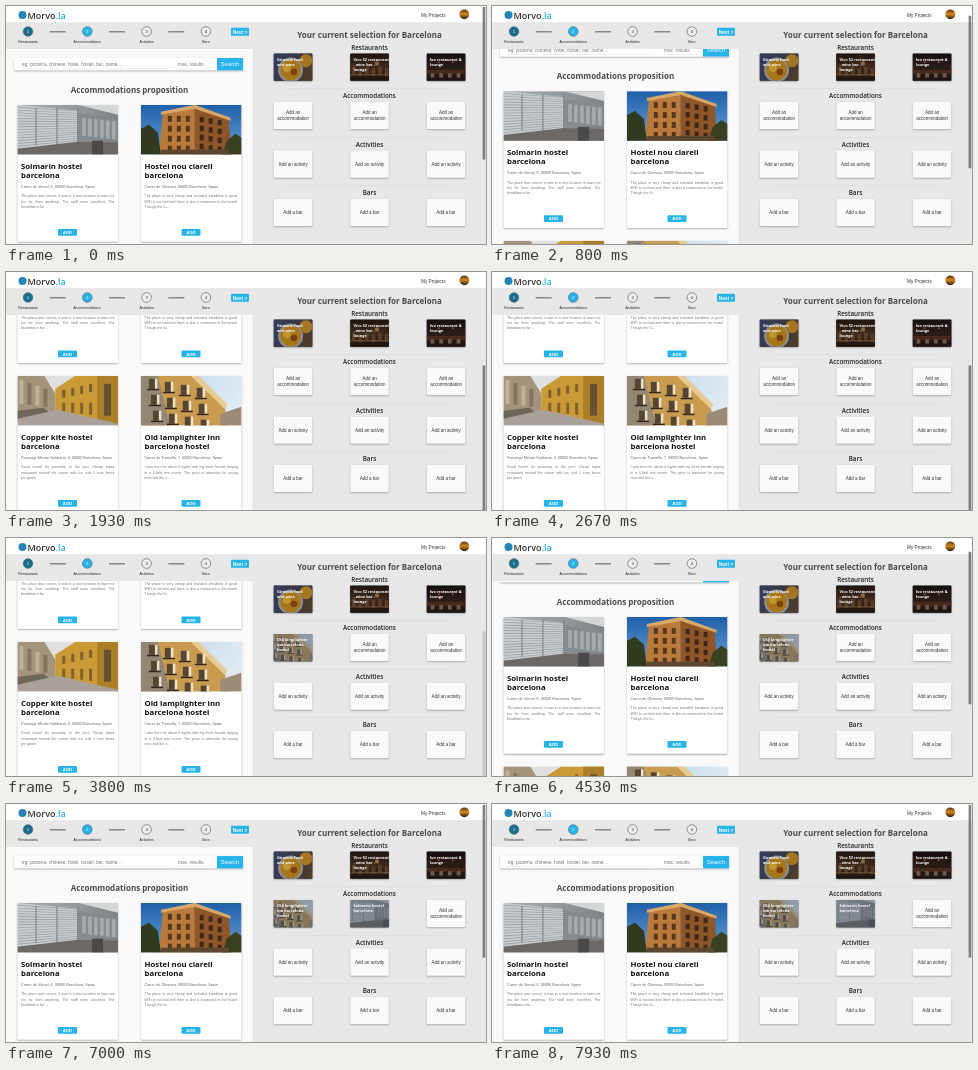
These frames come from a looping animation (480 by 238 pixels, 8000 ms). An HTML page with a canvas:

```html
<!DOCTYPE html>
<html lang="en">
<head>
<meta charset="utf-8">
<title>Trip planner</title>
<style>
html, body { margin: 0; width: 100%; height: 100%; overflow: hidden; background: #fafafa; }
canvas { display: block; width: 480px; height: 238px; }
</style>
</head>
<body>
<canvas id="stage"></canvas>
<script>
const W = 480, H = 238, LOOP = 8000;
const BLUE = '#27b4ea', TEAL = '#1b6c8a', GREY = '#e8e8e8';
const HEAD = '"Open Sans", sans-serif', BODY = '"Liberation Sans", sans-serif';
const canvas = document.getElementById('stage');
const ctx = canvas.getContext('2d');
const dpr = window.devicePixelRatio || 1;
canvas.width = W * dpr;
canvas.height = H * dpr;

const SCROLL = [[0, 0], [700, 0], [1270, 77.5], [1900, 144.5], [3900, 144.5], [4530, 20], [4800, 0], [LOOP, 0]];

function scrollAt(t) {
  const i = SCROLL.findIndex(k => k[0] > t);
  const [t0, a] = SCROLL[i - 1], [t1, b] = SCROLL[i];
  return a + (b - a) * (t - t0) / (t1 - t0);
}

function rect(x, y, w, h, fill) {
  ctx.fillStyle = fill;
  ctx.fillRect(x, y, w, h);
}

function pill(x, y, w, h, fill, r = 0.8) {
  ctx.fillStyle = fill;
  ctx.beginPath();
  ctx.roundRect(x, y, w, h, r);
  ctx.fill();
}

function poly(fill, ...p) {
  ctx.fillStyle = fill;
  ctx.beginPath();
  for (let i = 0; i < p.length; i += 2) ctx.lineTo(p[i], p[i + 1]);
  ctx.fill();
}

function disc(x, y, r, fill, stroke) {
  ctx.beginPath();
  ctx.arc(x, y, r, 0, Math.PI * 2);
  ctx.fillStyle = fill;
  ctx.fill();
  if (stroke) {
    ctx.strokeStyle = stroke;
    ctx.lineWidth = 0.7;
    ctx.stroke();
  }
}

function text(s, x, y, size, color, { weight = 400, font = BODY, align = 'left' } = {}) {
  ctx.font = `${weight} ${size}px ${font}`;
  ctx.textAlign = align;
  ctx.textBaseline = 'alphabetic';
  ctx.fillStyle = color;
  ctx.fillText(s, x, y);
}

function justify(s, x, y, width, size, color) {
  ctx.font = `400 ${size}px ${BODY}`;
  const words = s.split(' ');
  const widths = words.map(w => ctx.measureText(w).width);
  const gap = (width - widths.reduce((a, b) => a + b)) / (words.length - 1);
  words.forEach((w, i) => {
    text(w, x, y, size, color);
    x += widths[i] + gap;
  });
}

function raised(x, y, w, h, fill) {
  ctx.save();
  ctx.shadowColor = 'rgba(0,0,0,.35)';
  ctx.shadowBlur = 1.6 * dpr;
  ctx.shadowOffsetY = 0.8 * dpr;
  pill(x, y, w, h, fill);
  ctx.restore();
}

function gradient(x0, y0, x1, y1, ...colors) {
  const g = ctx.createLinearGradient(x0, y0, x1, y1);
  colors.forEach((c, i) => g.addColorStop(i / (colors.length - 1), c));
  return g;
}

// Scenes fill a 101 x 50 box.
const scenes = {
  louvre() {
    rect(0, 0, 101, 50, gradient(0, 0, 101, 50, '#a7adb0', '#92989b', '#777a7c'));
    poly('#c9cdcf', 0, 0, 60, 6, 60, 38, 0, 44);
    for (let i = 0; i < 15; i++) {
      const y = 2 + i * 2.8;
      poly('#9da4a8', 0, y, 60, 6 + i * 2.1, 60, 6.7 + i * 2.1, 0, y + 0.9);
    }
    for (const x of [18, 39, 60]) rect(x, 3, 1.2, 37, '#7f878b');
    poly('#848a8d', 61, 8, 101, 15, 101, 36, 61, 34);
    for (let i = 0; i < 6; i++) rect(65 + i * 6, 13 + i * 0.7, 3.6, 18, '#a6abac');
    poly('#6b6865', 0, 44, 60, 37, 101, 38, 101, 50, 0, 50);
    rect(75, 36, 11, 14, '#4a494a');
    poly('#d5d7d6', 61, 0, 101, 0, 101, 10);
  },
  brick() {
    rect(0, 0, 101, 50, gradient(0, 0, 0, 50, '#1f5fa8', '#6ba3d8'));
    poly('#b97a3c', 22, 8, 54, 2, 54, 50, 18, 50);
    poly('#8f562a', 54, 2, 88, 14, 91, 50, 54, 50);
    poly('#d9a766', 20, 7, 54, 0, 90, 13, 90, 16, 54, 4, 20, 10);
    for (let r = 0; r < 4; r++) {
      for (let c = 0; c < 3; c++) {
        rect(27 + c * 9, 11 + r * 10, 4, 6, '#55371f');
        rect(59 + c * 9, 12 + r * 9 + c * 1.5, 4, 5.5, '#3f2818');
      }
    }
    poly('#2f3a20', 0, 24, 8, 20, 17, 28, 20, 50, 0, 50);
    poly('#38401f', 86, 36, 95, 29, 101, 33, 101, 50, 82, 50);
    rect(20, 45, 68, 5, '#5b4630');
  },
  yellow() {
    rect(0, 0, 101, 50, '#dfe0df');
    poly('#a3947b', 0, 0, 27, 0, 38, 18, 38, 36, 0, 42);
    for (let i = 0; i < 4; i++) rect(2 + i * 8, 4 + i * 3, 4, 24 - i * 2, i % 2 ? '#82745f' : '#c0b199');
    poly('#c99a35', 38, 13, 58, 0, 101, 0, 101, 50, 38, 36);
    poly('#ab7f28', 80, 0, 101, 0, 101, 50, 80, 45);
    for (let i = 0; i < 4; i++) {
      rect(45 + i * 9, 14 - i * 2, 3, 8, '#7d5e30');
      rect(45 + i * 9, 27, 3, 9 + i, '#80622f');
    }
    rect(87, 8, 7, 32, '#66502f');
    poly('#aaa29a', 0, 41, 40, 34, 101, 48, 101, 50, 0, 50);
    poly('#6d6659', 0, 35, 26, 32, 31, 36, 0, 43);
  },
  ochre() {
    rect(0, 0, 101, 50, gradient(0, 0, 101, 50, '#b6d3ea', '#e6eef4'));
    poly('#c99b50', 0, 0, 57, 0, 84, 29, 87, 50, 0, 50);
    poly('#928675', 0, 0, 17, 0, 29, 50, 0, 50);
    poly('#e6cb94', 50, 0, 58, 0, 87, 29, 84, 33);
    for (let r = 0; r < 3; r++) {
      for (let c = 0; c < 4; c++) {
        const x = 8 + c * 16 + r * 2, y = 3 + r * 16 + c * 3;
        rect(x, y, 6, 10, '#574533');
        rect(x + 6, y, 2.5, 10, '#efe3c6');
        rect(x - 2, y + 10, 12, 1.5, '#30241c');
      }
    }
    poly('#9c8b74', 80, 38, 101, 31, 101, 50, 80, 50);
  },
  food() {
    rect(0, 0, 101, 50, gradient(0, 0, 101, 50, '#3d4c7c', '#40404d', '#6a4b22'));
    disc(46, 30, 23, '#a3a6aa');
    disc(46, 30, 19, '#c48a1d');
    disc(39, 27, 7, '#e0b13a');
    disc(52, 34, 6, '#8f4a18');
    disc(74, 13, 12, '#c08a2a');
  },
  cellar() {
    rect(0, 0, 101, 50, gradient(0, 0, 0, 50, '#241710', '#493021', '#1e1512'));
    for (let i = 0; i < 6; i++) rect(18 + i * 12, 24 + i % 2 * 3, 7, 14, '#67482f');
    rect(15, 38, 72, 2, '#8b623f');
    disc(64, 18, 4, '#a57a4c');
  },
  lounge() {
    rect(0, 0, 101, 50, gradient(0, 0, 0, 50, '#171111', '#33201a', '#201814'));
    for (let i = 0; i < 5; i++) disc(24 + i * 13, 12 + i % 2 * 4, 1.8, '#a35e2b');
    rect(15, 30, 72, 7, '#573022');
    for (let i = 0; i < 4; i++) rect(22 + i * 16, 36, 7, 8, '#7d6a5f');
  }
};

function scene(name, x, y, w, h) {
  const k = Math.max(w / 101, h / 50);
  ctx.save();
  ctx.beginPath();
  ctx.rect(x, y, w, h);
  ctx.clip();
  ctx.translate(x + (w - 101 * k) / 2, y + (h - 50 * k) / 2);
  ctx.scale(k, k);
  scenes[name]();
  ctx.restore();
}

const hostels = [
  { art: 'louvre', x: 11.5, y: 99, title: ['Solmarin hostel', 'barcelona'],
    place: 'Carrer de Vernal, 6, 08000 Barcelona, Spain',
    note: ['The place was correct, it was in a nice location in town not', 'too far from anything. The staff were excellent. The', 'breakfast is far ...'] },
  { art: 'brick', x: 135, y: 99, title: ['Hostel nou clarell', 'barcelona'],
    place: 'Carrer de Olivessa, 08000 Barcelona, Spain',
    note: ['The place is very cheap and included breakfast is good.', 'WiFi is not bad and there is also a restaurant in the hostel.', 'Though the fu...'] },
  { art: 'yellow', x: 11.5, y: 248.5, title: ['Copper kite hostel', 'barcelona'],
    place: 'Passatge Mestre Galdrana, 4, 08000 Barcelona, Spain',
    note: ['Good hostel for proximity to the port. Cheap tapas', 'restaurant around the corner with ice cold 1 euro beers', 'pre game'] },
  { art: 'ochre', x: 135, y: 248.5, title: ['Old lamplighter inn', 'barcelona hostel'],
    place: 'Carrer de Tramella, 7, 08000 Barcelona, Spain',
    note: ['I was here for about 4 nights with my three friends staying', 'in a 6-bed mix rooms. The price is attractive for young', 'men and the s...'] }
];

function hostelCard(h, hover) {
  const { x, y } = h;
  raised(x, y, 100.5, 136.8, '#fff');
  scene(h.art, x, y, 100.5, 49.5);
  h.title.forEach((s, i) => text(s, x + 3.5, y + 64.2 + i * 8.9, 7.8, '#111', { weight: 700, font: HEAD }));
  text(h.place, x + 3.5, y + 82.5, 3.75, '#666');
  h.note.forEach((s, i) => {
    const ty = y + 92.4 + i * 5.2;
    if (i < 2) justify(s, x + 3.5, ty, 93.5, 3.55, '#777');
    else text(s, x + 3.5, ty, 3.55, '#777');
  });
  pill(x + 40.5, y + 124, 19, 6.8, hover ? TEAL : BLUE);
  text('ADD', x + 50, y + 129, 4.3, '#fff', { weight: 700, align: 'center' });
}

function leftPanel(t) {
  ctx.save();
  ctx.beginPath();
  ctx.rect(0, 0, 247, H);
  ctx.clip();
  rect(0, 0, 247, H, '#fafafa');
  ctx.translate(0, -scrollAt(t));
  raised(8, 51.5, 229, 13, '#fff');
  text('eg: pizzeria, chinese, hotel, hostel, bar, name...', 16, 59.8, 4.75, '#777');
  text('max. results', 172, 59.8, 4.75, '#777');
  rect(14, 62, 149, 0.4, '#ddd');
  rect(170, 62, 37, 0.4, '#ddd');
  rect(211, 52, 26, 12.3, BLUE);
  text('Search', 224, 60.2, 5.8, '#fff', { align: 'center' });
  text('Accommodations proposition', 123.5, 86.8, 8, '#4a4a4a', { weight: 700, font: HEAD, align: 'center' });
  const hovered = t > 2900 && t < 3450 ? 3 : t > 5500 && t < 7000 ? 0 : -1;
  hostels.forEach((h, i) => hostelCard(h, i === hovered));
  ctx.restore();
}

function steps() {
  rect(0, 16, 247, 27, GREY);
  ['Restaurants', 'Accommodations', 'Activities', 'Bars'].forEach((label, i) => {
    const x = 22 + i * 59.3;
    if (i < 3) rect(x + 21.7, 25, 16, 1.5, '#888');
    disc(x, 25.5, 4.8, [TEAL, BLUE][i] || '#eee', i < 2 ? '#54717d' : '#666');
    text(i + 1, x, 27.1, 4.3, i < 2 ? '#fff' : '#333', { align: 'center' });
    text(label, x, 37.4, 3.6, '#222', { align: 'center' });
  });
  pill(225, 21.8, 18, 8, BLUE);
  text('Next >', 234, 27.5, 4.8, '#fff', { weight: 700, align: 'center' });
}

function header() {
  rect(0, 0, W, 16.6, '#fff');
  rect(0, 16.6, W, 0.5, '#d9d9d9');
  disc(16.5, 9, 4, '#2583b5');
  text('Morvo', 21.5, 12.8, 9, '#333', { weight: 600, font: HEAD });
  const w = ctx.measureText('Morvo').width;
  text('.la', 21.5 + w, 12.8, 9, BLUE, { weight: 600, font: HEAD });
  text('My Projects', 415, 11, 4.7, '#333');
  disc(458.3, 8.3, 4.9, gradient(458, 3, 458, 13, '#4b2a14', '#d78a1d', '#2c1c15'));
}

function photoTile(x, y, art, lines, veil) {
  raised(x, y, 38.5, 27.2, '#333');
  scene(art, x, y, 38.5, 27.2);
  rect(x, y, 38.5, 27.2, veil);
  lines.forEach((s, i) => text(s, x + 3.2, y + 7 + i * 5.2, 3.9, '#fff', { weight: 700, font: HEAD }));
}

function emptyTile(x, y, lines) {
  raised(x, y, 38.5, 27.2, '#fafafa');
  const first = y + 15.2 - (lines.length - 1) * 2.8;
  lines.forEach((s, i) => text(s, x + 19.25, first + i * 5.6, 4.5, '#333', { align: 'center' }));
}

const restaurants = [
  ['food', ['Girasola food', 'and wine']],
  ['cellar', ['Vico 52 restaurant', '- wine bar -', 'lounge']],
  ['lounge', ['Ivo restaurant &', 'lounge']]
];
const picks = [
  [3350, 'ochre', ['Old lamplighter', 'inn barcelona', 'hostel']],
  [6500, 'louvre', ['Solmarin hostel', 'barcelona']]
];
const sections = [
  ['Restaurants', 47.6],
  ['Accommodations', 96, ['Add an', 'accommodation']],
  ['Activities', 144.5, ['Add an activity']],
  ['Bars', 193, ['Add a bar']]
];

function rightPanel(t) {
  rect(247, 16, W - 247, H - 16, GREY);
  rect(246.8, 43, 0.5, H, '#d8d8d8');
  text('Your current selection for Barcelona', 363.5, 31.8, 8, '#4a4a4a', { weight: 700, font: HEAD, align: 'center' });
  sections.forEach(([name, y, hint], row) => {
    text(name, 363.5, y - 3.6, 6.3, '#222', { weight: 600, font: HEAD, align: 'center' });
    if (row) rect(283, y - 13.4, 162, 0.5, '#d5d5d5');
    for (let i = 0; i < 3; i++) {
      const x = 267.8 + i * 76.5;
      const pick = row === 1 && picks[i];
      if (row === 0) photoTile(x, y, ...restaurants[i], 'rgba(0,0,0,.15)');
      else if (pick && t >= pick[0]) photoTile(x, y, pick[1], pick[2], 'rgba(75,85,98,.5)');
      else emptyTile(x, y, hint);
    }
  });
}

function scrollbar(t) {
  const resting = t > 2900 && t < 3900;
  const y = scrollAt(t) * 0.64;
  pill(476.6, y + 0.7, 2.7, 153, `rgba(90,90,90,${resting ? 0.25 : 0.75})`, 1.3);
}

function draw(t) {
  ctx.setTransform(dpr, 0, 0, dpr, 0, 0);
  leftPanel(t);
  rightPanel(t);
  steps();
  header();
  scrollbar(t);
}

const start = performance.now();
function tick() {
  draw((performance.now() - start) % LOOP);
  requestAnimationFrame(tick);
}
tick();
</script>
</body>
</html>
```
